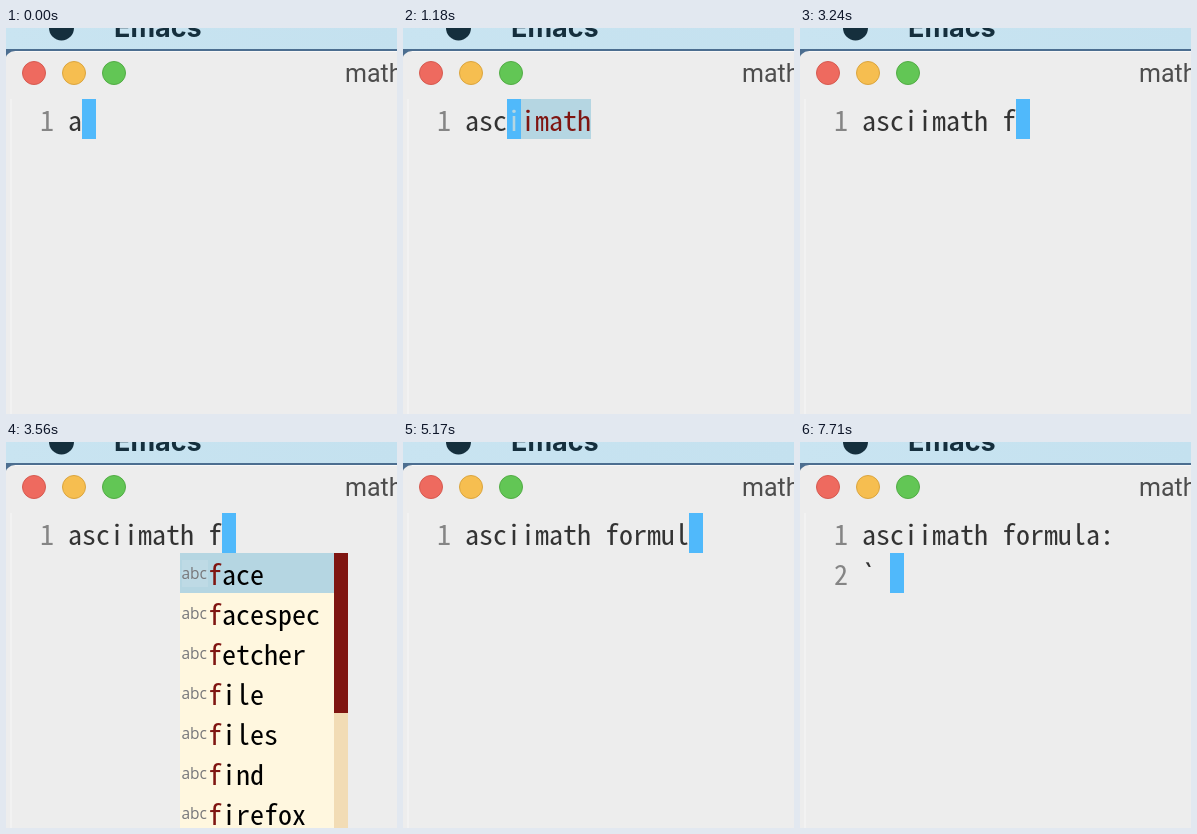
Write an HTML page with a canvas that moves like this. It is 391 px wide and 386 px high and loops after 8000 ms.

```html
<!DOCTYPE html>
<html lang="en">
<head>
<meta charset="utf-8">
<title>Editor completion</title>
<style>
  html, body { margin: 0; width: 100%; height: 100%; overflow: hidden; background: #ededed; }
  canvas { display: block; }
</style>
</head>
<body>
<canvas id="stage" width="391" height="386"></canvas>
<script>
const ctx = document.getElementById('stage').getContext('2d');
const LOOP = 8000, CELL = 14, ROW = 40, LEFT = 62, TOP = 71;
const MONO = '"Noto Sans Mono CJK JP", "Noto Sans Mono CJK SC", "Noto Sans Mono", monospace';
const BLUE = '#50b9fb', PALE = '#b5d6e2', RED = '#7f1511', CREAM = '#fff7df', INK = '#333333';

// Pick the size at which one character fills one grid cell.
ctx.font = `100px ${MONO}`;
const codeFont = `${100 * CELL / ctx.measureText('0').width}px ${MONO}`;

const WORD = 'asciimath';
const F_WORDS = ['face', 'facespec', 'fetcher', 'file', 'files', 'find', 'firefox'];
const FORMULAS = ['formula', 'formulas'];

const menu = (start, common, items, scroll = 0) => ({ start, common, items, scroll });

// Each step holds until the next; "ghost" is the inline completion after the cursor.
const steps = [
  { at: 0, text: 'a' },
  { at: 1000, text: 'as', popup: menu(0, 2, [WORD, 'aspell', 'assoc']) },
  ...[1180, 1480, 1720, 1880, 2230, 2340, 2550].map((at, i) =>
    ({ at, text: WORD.slice(0, 3 + i), ghost: WORD.slice(3 + i) })),
  { at: 2640, text: 'asciimath ' },
  { at: 3240, text: 'asciimath f' },
  { at: 3560, text: 'asciimath f', popup: menu(10, 1, F_WORDS, 4) },
  { at: 3680, text: 'asciimath fo', popup: menu(10, 2, ['follow', 'for', 'format', ...FORMULAS]) },
  { at: 3800, text: 'asciimath form', popup: menu(10, 4, ['format', ...FORMULAS]) },
  { at: 3910, text: 'asciimath formu', popup: menu(10, 7, FORMULAS) },
  { at: 4110, text: 'asciimath formua' },
  { at: 4340, text: 'asciimath formu' },
  { at: 5170, text: 'asciimath formul' },
  { at: 5380, text: 'asciimath formula', popup: menu(10, 7, FORMULAS) },
  { at: 5620, text: 'asciimath formula:' },
  { at: 6080, text: 'asciimath formula:\n' },
  { at: 6570, text: 'asciimath formula:\n`' },
  { at: 7710, text: 'asciimath formula:\n` ' },
];

function rect(x, y, w, h, color) {
  ctx.fillStyle = color;
  ctx.fillRect(x, y, w, h);
}

function disc(x, y, r, color, border) {
  ctx.beginPath();
  ctx.arc(x, y, r, 0, Math.PI * 2);
  ctx.fillStyle = color;
  ctx.fill();
  if (border) {
    ctx.strokeStyle = border;
    ctx.lineWidth = 1;
    ctx.stroke();
  }
}

function label(text, x, y, font, color) {
  ctx.font = font;
  ctx.fillStyle = color;
  ctx.fillText(text, x, y);
}

const colX = col => LEFT + col * CELL;
const rowY = row => TOP + row * ROW;
const cells = (col, row, count, color, rows = 1) =>
  rect(colX(col), rowY(row), count * CELL, rows * ROW, color);
const code = (text, col, row, color) =>
  label(text, colX(col), rowY(row) + 32, codeFont, color);

function drawWindow() {
  const bar = ctx.createLinearGradient(0, 0, 391, 0);
  bar.addColorStop(0, '#c9e4f1');
  bar.addColorStop(1, '#c4e1ef');
  rect(0, 0, 391, 21, bar);
  rect(0, 21, 391, 12, '#4c6e90');
  disc(55.5, 0, 12.5, '#152f3d');
  label('Emacs', 108, 9, '700 27px Inter, sans-serif', '#152f3d');

  ctx.beginPath();
  ctx.roundRect(-1, 23, 420, 400, 10);
  ctx.fillStyle = '#ededed';
  ctx.fill();
  rect(9, 23, 382, 1, '#f8f8f8');
  rect(4, TOP, 2, 315, '#f2f2f2');

  disc(28, 45, 11.5, '#ee6a5f', '#d65a50');
  disc(68, 45, 11.5, '#f6be50', '#dba53e');
  disc(108, 45, 11.5, '#62c655', '#52ac45');
  label('math', 339, 54, '25px Roboto, sans-serif', '#4d4d4d');
}

function drawPopup({ start, common, items, scroll }) {
  const left = Math.max(0, start - 2);
  const width = Math.max(...items.map(item => item.length)) + 3;
  items.forEach((item, i) => {
    const row = i + 1;
    cells(left, row, width, i ? CREAM : PALE);
    if (!i) rect(colX(left) + 2, rowY(row) + 7, 26, 27, '#bedae5');
    label('abc', colX(left) + 1.5, rowY(row) + 25.5, '15.5px "Open Sans", sans-serif', '#77777a');
    code(item.slice(0, common), left + 2, row, RED);
    code(item.slice(common), left + 2 + common, row, '#000');
  });
  if (scroll) {
    cells(left + width, 1, 1, '#f2dcb5', items.length);
    cells(left + width, 1, 1, RED, scroll);
  }
}

function draw(time) {
  const { text, ghost = '', popup } = steps.findLast(step => step.at <= time);
  const lines = text.split('\n');
  const row = lines.length - 1, col = lines[row].length;

  drawWindow();
  lines.forEach((line, i) => {
    if (!i || line) code(i + 1, -2, i, '#858585');
    code(line, 0, i, INK);
  });
  cells(col, row, ghost.length, PALE);
  cells(col, row, 1, BLUE);
  code(ghost.slice(0, 1), col, row, PALE);
  code(ghost.slice(1), col + 1, row, RED);
  if (popup) drawPopup(popup);
}

function tick() {
  draw(performance.now() % LOOP);
  requestAnimationFrame(tick);
}
tick();
</script>
</body>
</html>
```
